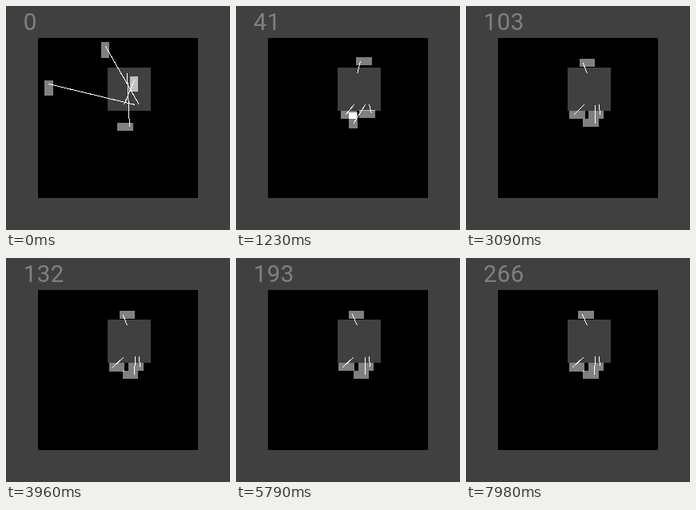
Animation, 280 px wide and 280 px high, one loop 8000 ms. Source, as an HTML page:

```html
<!DOCTYPE html>
<html lang="en">
<head>
<meta charset="utf-8">
<title>Placement</title>
<style>
  html, body { margin: 0; width: 100%; height: 100%; overflow: hidden; background: #404040; }
  svg { display: block; width: 100vw; height: 100vh; }
  text { font: 400 29.5px Roboto, Inter, sans-serif; fill: #808080; text-anchor: middle; }
  .board { isolation: isolate; shape-rendering: crispEdges; }
  .part { fill: #808080; mix-blend-mode: plus-lighter; }
  line { stroke: #fff; stroke-width: 1; }
</style>
</head>
<body>
<svg viewBox="0 0 280 280">
  <text id="count" x="30 47 64" y="30"></text>
  <g class="board" id="board">
    <rect x="40" y="40" width="200" height="200" fill="#000"/>
    <rect x="127" y="77" width="54" height="54" fill="#404040"/>
  </g>
</svg>
<script>
const LOOP = 8000, STEP = 30, ARRIVE = 570;
const LONG = 19.5, SHORT = 10.4, PIN = 5;
const RIGHT = [1, 0], DOWN = [0, 1], LEFT = [-1, 0], UP = [0, -1];

const board = document.getElementById('board');
const count = document.getElementById('count');

const pose = (x, y, dir) => ({ x, y, dir });

// Each part flies from start to touch (bowed sideways), then settles at rest.
const parts = [
  { pad: [151, 84], bow: 33, tau: 840,
    start: pose(149, 151, RIGHT), touch: pose(170.6, 67, LEFT), rest: pose(150.7, 71, LEFT) },
  { pad: [147, 123], bow: 0, tau: 300,
    start: pose(160, 97.4, UP), touch: pose(157.6, 135.5, LEFT), rest: pose(138.6, 136.3, LEFT) },
  { pad: [161, 123], bow: 0, tau: 300,
    start: pose(53.5, 102.4, UP), touch: pose(70, 119.4, DOWN), rest: pose(156, 146, RIGHT) },
  { pad: [166, 123], bow: 20, tau: 300,
    start: pose(124, 55, UP), touch: pose(177.1, 128, RIGHT), rest: pose(162.6, 136, RIGHT) }
];

function add(tag, cls) {
  const el = document.createElementNS('http://www.w3.org/2000/svg', tag);
  if (cls) el.setAttribute('class', cls);
  return board.appendChild(el);
}

function set(el, attrs) {
  for (const name in attrs) el.setAttribute(name, attrs[name]);
}

// Repeatable noise in -1..1
function noise(n) {
  const v = Math.sin(n * 12.9898) * 43758.5453;
  return (v - Math.floor(v)) * 2 - 1;
}

function mix(a, b, u, turnAt) {
  return pose(a.x + (b.x - a.x) * u, a.y + (b.y - a.y) * u, u < turnAt ? a.dir : b.dir);
}

function locate(p, t, seed) {
  if (t <= ARRIVE) {
    const u = t / ARRIVE, at = mix(p.start, p.touch, u, 0.5);
    at.x += p.bow * Math.sin(Math.PI * u);
    return at;
  }
  const u = 1 - Math.exp((ARRIVE - t) / p.tau), at = mix(p.touch, p.rest, u, 0.93);
  at.x += 0.6 * u * noise(t / STEP + seed);
  at.y += 0.3 * u * noise(t / STEP + seed + 500);
  return at;
}

for (const p of parts) p.box = add('rect', 'part');
for (const p of parts) p.wire = add('line');

function draw(t) {
  const step = Math.floor(t / STEP);
  count.textContent = step;
  parts.forEach((p, i) => {
    const { x, y, dir: [dx, dy] } = locate(p, step * STEP, i * 1000);
    const w = dx ? LONG : SHORT, h = dx ? SHORT : LONG;
    set(p.box, { x: x - w / 2, y: y - h / 2, width: w, height: h });
    set(p.wire, {
      x1: p.pad[0] + 0.5, y1: p.pad[1] + 0.5,
      x2: Math.floor(x + dx * PIN) + 0.5, y2: Math.floor(y + dy * PIN) + 0.5
    });
  });
}

const start = performance.now();
function tick() {
  draw((performance.now() - start) % LOOP);
  requestAnimationFrame(tick);
}
tick();
</script>
</body>
</html>
```
